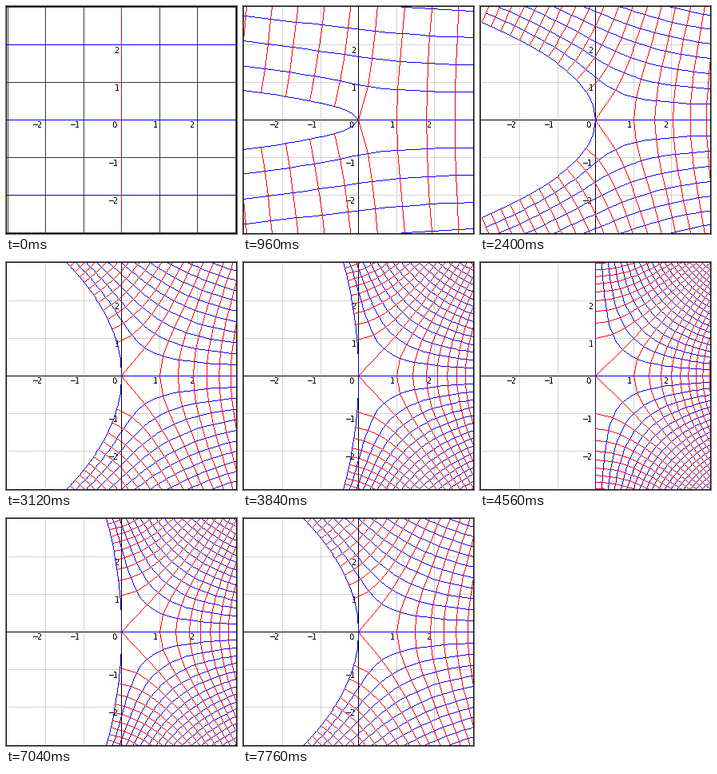
A matplotlib script for the animation above (8000 ms loop, 289 px wide and 285 px high).

```python
import matplotlib.pyplot as plt
import numpy as np
from matplotlib.animation import FuncAnimation

W, H, DPI = 289, 285, 64
STEP = 80                     # ms per tick
CX, CY, UX, UY = 144, 142, 47.5, 47.0
BLUE, RED, BLACK = (0, 0, 255), (255, 0, 0), (0, 0, 0)
DARK, GREY = (56, 56, 56), (168, 168, 168)

fig = plt.figure(figsize=(W / DPI, H / DPI), dpi=DPI, facecolor="white")
ax = fig.add_axes([0, 0, 1, 1])
ax.axis("off")


def pixel(v):
    return np.floor(v + 0.5).astype(int)


def column(n):
    return pixel(CX + n * UX)


def row(n):
    return pixel(CY - n * UY)


def blank():
    return np.zeros((H, W, 4), np.uint8)


def paint(img, where, color):
    img[where] = (*color, 255)


def trace(img, lines, color):
    """Draw polylines of complex points, one pixel wide, without smoothing."""
    a = np.concatenate([z[:-1] for z in lines])
    b = np.concatenate([z[1:] for z in lines])
    x, y = column(a.real), row(a.imag)
    dx, dy = column(b.real) - x, row(b.imag) - y
    n = np.maximum(np.maximum(abs(dx), abs(dy)), 1)
    s = np.minimum(np.arange(n.max() + 1) / n[:, None], 1)
    px = pixel(x[:, None] + s * dx[:, None])
    py = pixel(y[:, None] + s * dy[:, None])
    ok = (px >= 0) & (px < W) & (py >= 0) & (py < H)
    paint(img, (py[ok], px[ok]), color)


def backdrop():
    img = blank()
    img[:] = 255
    for n in (-2, -1, 1, 2):
        paint(img, np.s_[::2, column(n)], GREY)
        paint(img, np.s_[row(n), ::2], GREY)
    paint(img, np.s_[:, CX], BLACK)
    paint(img, np.s_[CY, :], BLACK)
    return img


def frame_edge(img):
    for side in (np.s_[0], np.s_[-1], np.s_[:, 0], np.s_[:, -1]):
        paint(img, side, BLACK)


def flat_grid():
    """The undistorted grid: dark lines, blue even rows, red vertical axis."""
    img = blank()
    for n in (-3, -2, -1, 1, 2, 3):
        paint(img, np.s_[:, column(n)], DARK)
    for n in range(-3, 4):
        paint(img, np.s_[row(n), :], DARK if n % 2 else BLUE)
    paint(img, np.s_[:, CX], RED)
    return img


# lines of the upper half plane; the lower half is the mirror image
xs = np.arange(-12, 12.1, 0.5)
ys = np.arange(0, 21)
edge = np.arange(-12, 12.1, 0.25)
rows = [edge + 0j] + [xs + 1j * y for y in range(1, 21)]
cols = [x + 1j * ys for x in range(-12, 13)]


def bend(lines, t):
    """Blend from z to sqrt(z), both halves."""
    upper = [(1 - t) * z + t * np.sqrt(z) for z in lines]
    return upper + [w.conj() for w in upper]


def mesh(k):
    if k == 0:
        img = flat_grid()
    else:
        t = 1 if k == 19 else 1 - (1 - k / 20) ** 2
        img = blank()
        trace(img, bend(rows, t), BLUE)
        trace(img, bend(cols, t), RED)
    frame_edge(img)
    return img


def layer(img, z):
    return ax.imshow(img, extent=(0, W, H, 0), interpolation="nearest",
                     aspect="auto", zorder=z)


def label(x, base, text, font="DejaVu Sans Mono"):
    ax.text(x, base, text, family=font, fontsize=10 * 72 / DPI, color="black",
            va="baseline", antialiased=False, zorder=2)


layer(backdrop(), 1)
net = layer(blank(), 3)
ax.set_xlim(0, W)
ax.set_ylim(H, 0)

for x, text in ((34, "\u22122"), (81, "\u22121"), (184, "1"), (230, "2")):
    label(x, 152, text)
label(133, 152, "0", "DejaVu Sans")
for base, text in ((59, "2"), (106, "1")):
    label(136, base, text)
for base, text in ((200, "\u22121"), (247, "\u22122")):
    label(129, base, text)


def stage(ms):
    if ms < 4560:
        return ms // 240
    if ms < 6560:
        return 19
    return 18 - (ms - 6560) // 240


def draw(i):
    net.set_data(mesh(stage(i * STEP)))
    return [net]


anim = FuncAnimation(fig, draw, frames=8000 // STEP, interval=STEP,
                     init_func=lambda: draw(0), repeat=True, repeat_delay=0)
plt.show()
```
